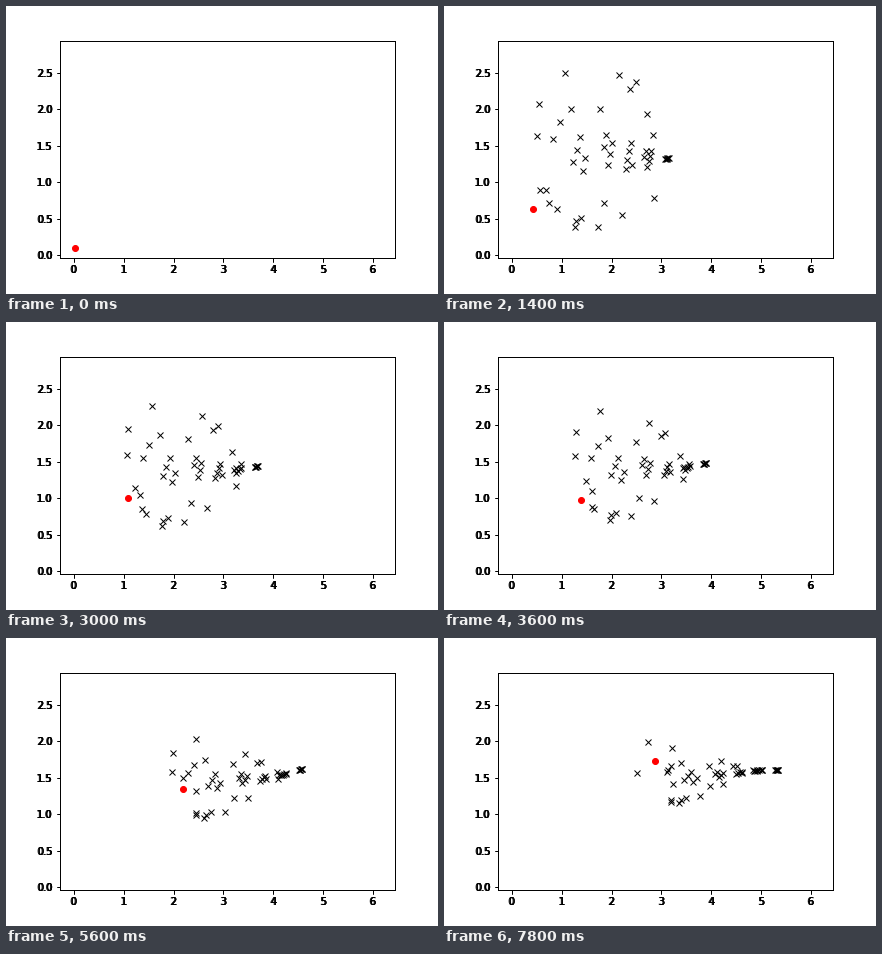
A matplotlib script that plays this animation: 432 by 288 pixels, repeating every 8000 ms.

```python
import numpy as np
import matplotlib.pyplot as plt
from matplotlib.animation import FuncAnimation

W, H, DPI = 432, 288, 72
FRAMES, INTERVAL = 40, 200
SPEED = 0.07                     # flock step per frame, in data units
FEAR, PUSH = 0.35, 0.08          # range and strength of the hunter's scare
START = 7                        # frame at which the flock is laid out

# Corners of the hunter's zigzag
TURNS = [0, 6, 15, 22, 28, 32, 39]
TURN_X = [0.025, 0.34, 1.08, 1.77, 2.19, 2.235, 2.87]
TURN_Y = [0.1, 0.59, 1.0, 0.95, 1.35, 1.715, 1.733]

# Outer members of the flock
RIM = [
    (0.56, 0.90), (0.68, 0.90), (0.74, 0.72), (0.90, 0.63), (0.50, 1.64),
    (0.54, 2.08), (0.82, 1.60), (0.96, 1.83), (1.18, 2.01), (1.06, 2.50),
    (1.76, 2.00), (2.14, 2.48), (2.36, 2.28), (2.49, 2.38), (2.71, 1.94),
    (2.83, 1.65), (2.85, 0.79), (2.20, 0.55), (1.84, 0.72), (1.72, 0.39),
    (1.38, 0.51), (1.28, 0.47), (1.26, 0.39),
]
INNER, HEAD = 21, 6


def lead(t):
    """Point the flock runs after: a straight climb that levels off."""
    return np.array([2.665 + 0.0687 * t,
                     1.238 + 0.0137 * t - 0.0165 * max(0, t - 29)])


def hunter(t):
    return np.array([np.interp(t, TURNS, TURN_X), np.interp(t, TURNS, TURN_Y)])


def layout():
    """Rim, an even scatter narrowing towards the lead, and the head."""
    i = np.arange(1, INNER + 1)
    u, v = i * 0.7549 % 1, i * 0.5698 % 1
    w = u ** 0.7
    inner = np.column_stack([
        1.1 + 1.9 * w,
        1.42 - 0.12 * w + (2 * v - 1) * (0.32 - 0.24 * w ** 2),
    ])
    head = np.linspace(lead(START - 1), lead(START), HEAD)
    return np.vstack([RIM, inner, head])


def split(d):
    """Unit vectors and lengths of the rows of d."""
    dist = np.hypot(d[:, 0], d[:, 1])[:, None]
    return d / np.maximum(dist, 1e-9), dist


def chase(pos, t):
    unit, dist = split(lead(t) - pos)
    return unit * np.minimum(dist, SPEED)


def flee(pos, t):
    unit, dist = split(pos - hunter(t))
    return unit * PUSH * np.maximum(0, 1 - dist / FEAR)


def simulate():
    flock = [layout()]
    for t in range(START, 0, -1):
        flock.insert(0, flock[0] - chase(flock[0], t + 1))
    for t in range(START, FRAMES - 1):
        pos = flock[-1]
        flock.append(pos + chase(pos, t + 1) + flee(pos, t))
    return flock


flock = simulate()

fig = plt.figure(figsize=(W / DPI, H / DPI), dpi=DPI, facecolor="white")


def add_layer(shift=0, labels_only=False):
    ax = fig.add_axes([0.125 + shift / W, 0.125, 0.775, 0.755],
                      label=str(len(fig.axes)), facecolor="none")
    ax.set_xlim(-0.281, 6.442)
    ax.set_ylim(-0.0405, 2.9465)
    ax.set_xticks(range(7))
    ax.set_yticks(np.arange(0, 3, 0.5))
    if labels_only:
        ax.spines[:].set_visible(False)
        ax.tick_params(length=0, pad=7)
    return ax


# Stacked layers give the dark frame and the heavy tick labels
add_layer(-1, labels_only=True)
for _ in range(3):
    ax = add_layer()

crosses, = ax.plot([], [], "kx", markersize=6)
dot, = ax.plot([], [], "ro", markersize=6)


def draw(t):
    shown = flock[t] if t else np.empty((0, 2))
    crosses.set_data(shown[:, 0], shown[:, 1])
    x, y = hunter(t)
    dot.set_data([x], [y])
    return crosses, dot


def reset():
    return draw(0)


anim = FuncAnimation(fig, draw, frames=FRAMES, init_func=reset,
                     interval=INTERVAL, repeat=True, repeat_delay=0)
plt.show()
```
